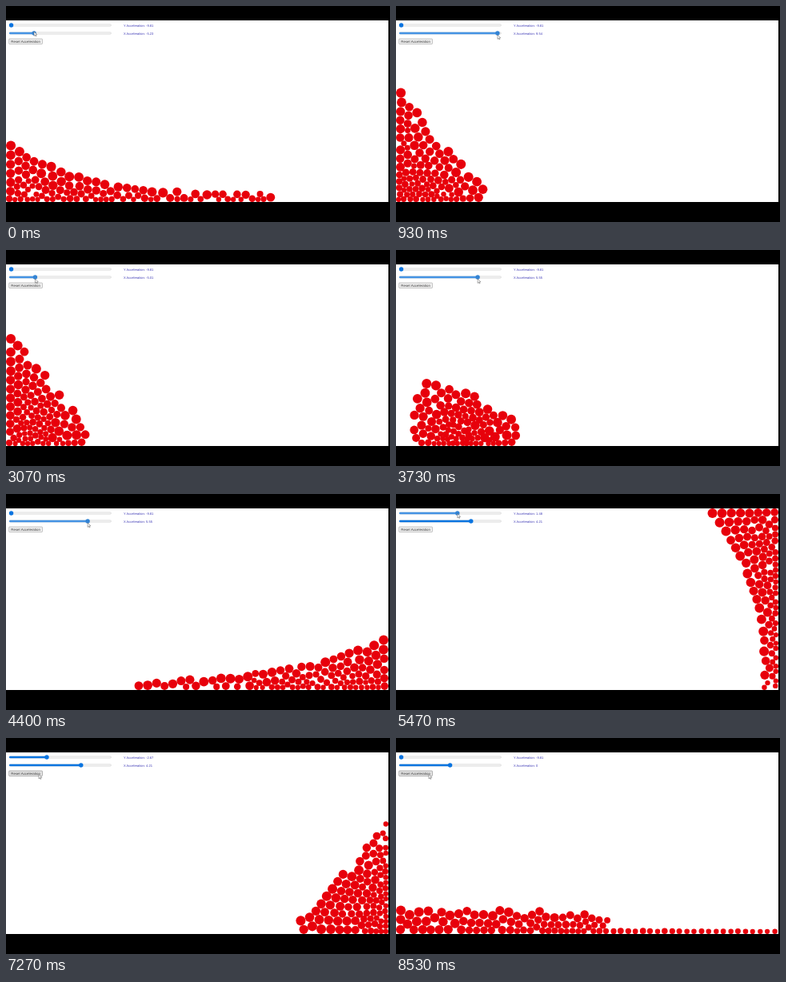
These frames come from a looping animation (480 by 270 pixels, 8.59 s). An HTML page:

```html
<!DOCTYPE html>
<html lang="en">
<head>
<meta charset="utf-8">
<title>Balls under acceleration</title>
<style>
  html, body { margin: 0; width: 100%; height: 100%; overflow: hidden; background: #000; }
  svg { display: block; width: 100%; height: 100%; }
  text { font-family: "Liberation Sans", Arial, sans-serif; text-rendering: geometricPrecision; white-space: pre; }
  .label { font-size: 4.06px; fill: #3a36b4; }
  .track { fill: #efefef; stroke: #c4c4c4; stroke-width: .35; }
  .fill, .thumb { fill: #0a74e0; }
  .active .fill { fill: #4493e4; }
  .active .thumb { fill: #3484d4; }
  #button rect { fill: #efefef; stroke: #868686; stroke-width: .45; }
  #button.hover rect { fill: #e3e3e3; stroke: #666; }
  #button text { font-size: 4.4px; fill: #333; }
  #balls { fill: #e7000b; }
  #cursor { fill: #fff; stroke: #444; stroke-width: .45; }
</style>
</head>
<body>
<svg viewBox="0 0 480 270">
  <rect y="18" width="478" height="227" fill="#fff"/>
  <g id="balls"></g>
  <g id="sliderY">
    <rect class="track" x="4" y="22.7" width="127.5" height="2.6" rx="1.3"/>
    <rect class="fill" x="4" y="22.7" height="2.6" rx="1.3"/>
    <circle class="thumb" cy="24" r="2.7"/>
    <text class="label" x="147" y="25.5"></text>
  </g>
  <g id="sliderX">
    <rect class="track" x="4" y="32.7" width="127.5" height="2.6" rx="1.3"/>
    <rect class="fill" x="4" y="32.7" height="2.6" rx="1.3"/>
    <circle class="thumb" cy="34" r="2.7"/>
    <text class="label" x="147" y="35.5"></text>
  </g>
  <g id="button">
    <rect x="3.7" y="41" width="41.8" height="6.6" rx=".9"/>
    <text x="24.6" y="45.8" text-anchor="middle">Reset Acceleration</text>
  </g>
  <path id="cursor" d="M0 0V5.4L1.3 4.2 2.1 6 2.9 5.6 2.1 3.9H3.8Z"/>
</svg>
<script>
const LOOP = 8590, RESET = 7330, COUNT = 104;
const TOP = 18, RIGHT = 478, FLOOR = 245;
const $ = id => document.getElementById(id);
const clamp = (v, lo, hi) => Math.max(lo, Math.min(hi, v));
const mix = (a, b, p) => a + (b - a) * p;

let seed = 41;
const random = () => (seed = (seed * 16807) % 2147483647) / 2147483647;
const radii = Array.from({ length: COUNT }, () => 3.1 + 3 * random());

// A heap that grows along its base from a thin end to a thick end.
const wedge = (from, to, thin, thick, power, onWall = false) => ({
  lo: Math.min(from, to), hi: Math.max(from, to), onWall,
  depth: u => mix(thin, thick, clamp((u - from) / (to - from), 0, 1) ** power),
});
const leftSlope = wedge(337, 0, 14, 82, 3.5);
const leftHeap = wedge(99, 0, 12, 150, .8);
const rightHeap = wedge(375, RIGHT, 10, 131, .75);
const rightSlope = wedge(163, RIGHT, 12, 74, 2.3);
const wallLayer = wedge(FLOOR, TOP, 26, 94, 3, true);
const ceilingHeap = wedge(230, TOP, 10, 90, 1.2, true);
const steepHeap = wedge(370, RIGHT, 12, 150, 1);
const spread = wedge(0, RIGHT, 12, 26, 1);
const ripples = { lo: 0, hi: RIGHT, depth: u => u < 265 ? 28 + 4 * Math.cos(u / 7.2) : 10 };

// Pushes overlapping balls apart and keeps them inside the walls.
function relax(pts, rounds, confine) {
  while (rounds--) {
    for (let i = 0; i < COUNT; i++) {
      const a = pts[i];
      for (let j = i + 1; j < COUNT; j++) {
        const b = pts[j], reach = radii[i] + radii[j];
        const dx = b.x - a.x, dy = b.y - a.y, sq = dx * dx + dy * dy;
        if (sq >= reach * reach) continue;
        const dist = Math.sqrt(sq) || .01, push = (reach - dist) / dist / 2;
        a.x -= dx * push; a.y -= dy * push;
        b.x += dx * push; b.y += dy * push;
      }
    }
    pts.forEach((p, i) => {
      const r = radii[i];
      if (confine) confine(p, r);
      p.x = clamp(p.x, r, RIGHT - r);
      p.y = clamp(p.y, TOP + r, FLOOR - r);
    });
  }
  return pts;
}

// Evenly scattered points inside a heap.
function scatter({ lo, hi, depth, onWall }) {
  const steps = 600, pts = [];
  const us = Array.from({ length: steps }, (_, s) => mix(lo, hi, (s + .5) / steps));
  const total = us.reduce((sum, u) => sum + depth(u), 0);
  let filled = 0;
  for (const u of us) {
    filled += depth(u) / total * COUNT;
    while (pts.length < COUNT && pts.length + .5 <= filled) {
      const d = depth(u) * ((pts.length * .618034 + .3) % 1);
      pts.push(onWall ? { x: RIGHT - d, y: u, d } : { x: u, y: FLOOR - d, d });
    }
  }
  return pts;
}

// Indices sorted along an axis, then by a second key within small groups.
function ranked(pts, axis, key) {
  const ids = pts.map((_, i) => i).sort((a, b) => pts[a][axis] - pts[b][axis]);
  const out = [];
  for (let i = 0; i < COUNT; i += 10)
    out.push(...ids.slice(i, i + 10).sort((a, b) => key(a) - key(b)));
  return out;
}

// Fills a heap with the balls: small ones sink, big ones stay at the surface.
function pack(before, heap) {
  const { lo, hi, depth, onWall } = heap, axis = onWall ? "y" : "x";
  const slots = scatter(heap), pts = [];
  const from = ranked(before || slots, axis, i => radii[i]);
  const to = ranked(slots, axis, i => slots[i].d);
  from.forEach((ball, k) => pts[ball] = { x: slots[to[k]].x, y: slots[to[k]].y });
  return relax(pts, 260, (p, r) => {
    p[axis] = clamp(p[axis], lo + r, hi - r);
    if (onWall) p.x = Math.max(p.x + .02, RIGHT - depth(p.y) + r);
    else p.y = Math.max(p.y + .02, FLOOR - depth(p.x) + r);
  });
}

const eases = {
  // Equal acceleration for all; each ball stops when it arrives.
  fall: (p, lag, ratio) => Math.min(1, clamp((p - .2 * lag) / (1 - .2 * lag), 0, 1) ** 2 * ratio),
  in: p => p ** 1.6,
  out: p => 1 - (1 - p) ** 2,
};

// Time, heap (none: stay), ease, how far the heap sinks on the way.
const poses = [
  [0, leftSlope],
  [560, leftHeap, "out", 0],
  [800],
  [1650, rightHeap, "fall", .5],
  [2150],
  [2950, leftHeap, "fall", .5],
  [3480],
  [4400, rightSlope, "in", .4],
  [4900, rightHeap, "out", 0],
  [5130],
  [5470, wallLayer, "in", 0],
  [5950, ceilingHeap, "out", 0],
  [6250],
  [7000, steepHeap, "fall", 0],
  [RESET],
  [7800, spread, "in", .15],
  [8530, ripples, "out", 0],
  [LOOP],
].map(([t, heap, ease, dip]) => ({ t, heap, ease, dip }));

poses.forEach((pose, k) => {
  const before = k ? poses[k - 1].pts : null;
  pose.pts = pose.heap ? pack(before, pose.heap) : before;
  if (!before || !pose.heap) return;
  const xs = before.map(p => p.x), lo = Math.min(...xs), hi = Math.max(...xs);
  const shift = pose.pts.reduce((sum, p, i) => sum + p.x - xs[i], 0);
  pose.lags = xs.map(x => (shift > 0 ? hi - x : x - lo) / (hi - lo));
  const dists = pose.pts.map((p, i) => Math.hypot(p.x - before[i].x, p.y - before[i].y) + .01);
  const far = Math.max(...dists);
  pose.ratios = dists.map(d => far / d);
});

function ballsAt(t) {
  const k = Math.max(1, poses.findIndex(pose => pose.t > t));
  const a = poses[k - 1], b = poses[k], time = (t - a.t) / (b.t - a.t);
  const pts = a.pts.map((from, i) => {
    if (!b.heap) return { ...from };
    const to = b.pts[i], p = eases[b.ease](time, b.lags[i], b.ratios[i]);
    const sink = 1 - b.dip * Math.sin(Math.PI * Math.sqrt(p));
    return { x: mix(from.x, to.x, p), y: FLOOR - (FLOOR - mix(from.y, to.y, p)) * sink };
  });
  return relax(pts, 14);
}

// Smooth value between rows of [time, ...values].
function along(rows, t) {
  const k = rows.findIndex(row => row[0] > t);
  if (k < 0) return rows.at(-1).slice(1);
  const a = rows[k - 1], b = rows[k], p = (t - a[0]) / (b[0] - a[0]);
  return a.slice(1).map((v, i) => mix(v, b[i + 1], p * p * (3 - 2 * p)));
}

// Each drag moves a slider, and the pointer goes with its thumb.
const drags = [
  ["X", 620, 900, 9.54],
  ["X", 1900, 2200, -5.01],
  ["X", 3250, 3550, 5.55],
  ["X", 4420, 4600, 4.21],
  ["Y", 4900, 5400, 1.48],
  ["Y", 6150, 6450, -2.67],
];
const thumbX = value => 67.6 + value * 6.22;
const pointerY = { X: 36, Y: 24.5 };
const now = { X: -5.23, Y: -9.81 };
const tracks = { X: [[0, now.X]], Y: [[0, now.Y]] };
const pointer = [[0, thumbX(now.X), 32]];
for (const [axis, start, end, value] of drags) {
  tracks[axis].push([start, now[axis]], [end, value]);
  pointer.push([start, thumbX(now[axis]), pointerY[axis]], [end, thumbX(value), pointerY[axis]]);
  now[axis] = value;
}
tracks.X.push([RESET, now.X], [RESET, 0]);
tracks.Y.push([RESET, now.Y], [RESET, -9.81]);
pointer.push([6900, 41, 45.5]);

function drawSlider(axis, t, active) {
  const g = $("slider" + axis), [value] = along(tracks[axis], t), x = thumbX(value);
  g.setAttribute("class", active ? "active" : "");
  g.querySelector(".fill").setAttribute("width", x - 4);
  g.querySelector(".thumb").setAttribute("cx", x);
  g.querySelector("text").textContent = `${axis} Acceleration: ${+value.toFixed(2)}`;
}

const circles = radii.map(r => {
  const c = document.createElementNS("http://www.w3.org/2000/svg", "circle");
  c.setAttribute("r", r);
  return $("balls").appendChild(c);
});

function draw(t) {
  ballsAt(t).forEach((p, i) => {
    circles[i].setAttribute("cx", p.x.toFixed(2));
    circles[i].setAttribute("cy", p.y.toFixed(2));
  });
  drawSlider("X", t, t < 4650);
  drawSlider("Y", t, t > 4880 && t < 6500);
  $("button").setAttribute("class", t > 6850 ? "hover" : "");
  $("cursor").setAttribute("transform", `translate(${along(pointer, t)})`);
}

const start = performance.now();
function tick() {
  draw((performance.now() - start) % LOOP);
  requestAnimationFrame(tick);
}
tick();
</script>
</body>
</html>
```
